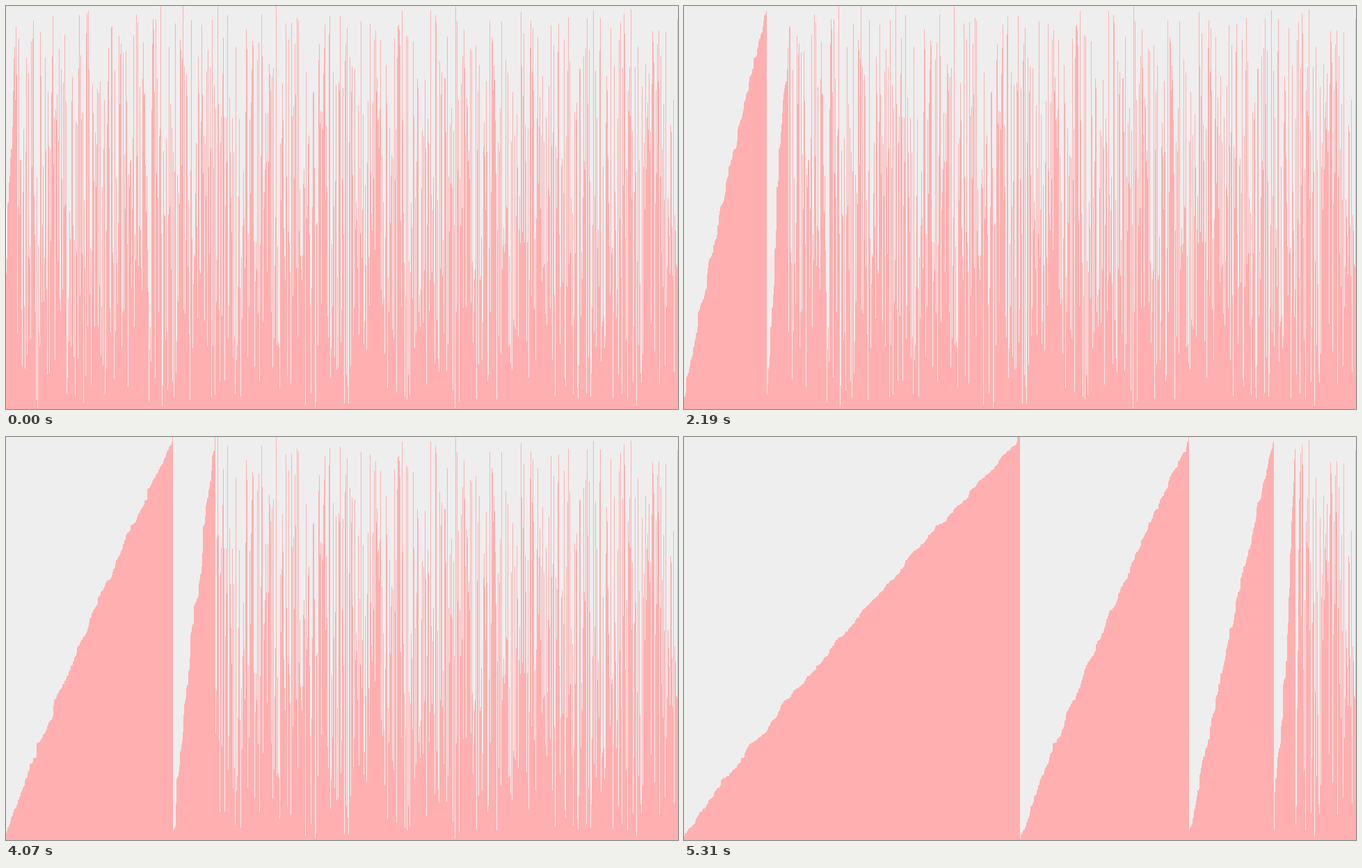
Recreate the animation shown at these times as an HTML page with a canvas. Size 966 by 580 pixels, loop 5.38 s.

```html
<!DOCTYPE html>
<html lang="en">
<head>
<meta charset="utf-8">
<title>Merge sort</title>
<style>
html, body { margin: 0; width: 100%; height: 100%; overflow: hidden; background: #eee; }
canvas { display: block; }
</style>
</head>
<body>
<canvas id="stage" width="966" height="580"></canvas>
<script>
const W = 966, H = 580, LOOP = 5380, STEP = 68.1, LAST = 78;
const COUNT = 972, OFFSET = 3; // the row of bars overhangs both edges
const GROUP = COUNT / 8;
const ctx = document.getElementById("stage").getContext("2d");

let seed = 20;
function random() {
  seed = (seed + 0x6D2B79F5) | 0;
  let t = Math.imul(seed ^ (seed >>> 15), 1 | seed);
  t = (t + Math.imul(t ^ (t >>> 7), 61 | t)) ^ t;
  return ((t ^ (t >>> 14)) >>> 0) / 4294967296;
}

// Each group of bars spreads unevenly over the full height, in shuffled order
const start = Float64Array.from({ length: COUNT }, (_, i) => {
  const rank = (i % GROUP) / GROUP + (random() - 0.5) * 0.06;
  return Math.round(H * Math.min(1, Math.abs(rank)) ** 0.91);
});
for (let lo = 0; lo < COUNT; lo += GROUP) {
  const first = Math.ceil(lo), end = Math.ceil(lo + GROUP);
  for (let i = end - 1; i > first; i--) {
    const j = first + Math.floor(random() * (i - first + 1));
    [start[i], start[j]] = [start[j], start[i]];
  }
}

// The sort runs steadily, then speeds up: [step, bars passed]
const pace = [[0, 18], [49, 229], [60, 308], [67, 506], [73, 608], [LAST, 890]];

function frontierAt(step) {
  const next = Math.max(1, pace.findIndex(([s]) => s >= step));
  const [s0, n0] = pace[next - 1], [s1, n1] = pace[next];
  return Math.floor(n0 + (n1 - n0) * (step - s0) / (s1 - s0));
}

// Every range that ends before the frontier has been merged
function mergeUpTo(bars, lo, hi, frontier) {
  if (lo >= frontier || hi - lo < 2) return;
  if (hi <= frontier) {
    bars.subarray(lo, hi).sort();
    return;
  }
  const mid = (lo + hi + 1) >> 1;
  mergeUpTo(bars, lo, mid, frontier);
  mergeUpTo(bars, mid, hi, frontier);
}

function draw(step) {
  const bars = start.slice();
  mergeUpTo(bars, 0, COUNT, frontierAt(step));
  ctx.fillStyle = "#eee";
  ctx.fillRect(0, 0, W, H);
  ctx.fillStyle = "#ffafaf";
  bars.forEach((h, i) => ctx.fillRect(i - OFFSET, H - h, 1, h));
}

let shown = -1;
const origin = performance.now();
function frame() {
  const time = (performance.now() - origin) % LOOP;
  const step = Math.min(LAST, Math.floor((time + 20) / STEP));
  if (step !== shown) draw(shown = step);
  requestAnimationFrame(frame);
}
frame();
</script>
</body>
</html>
```
